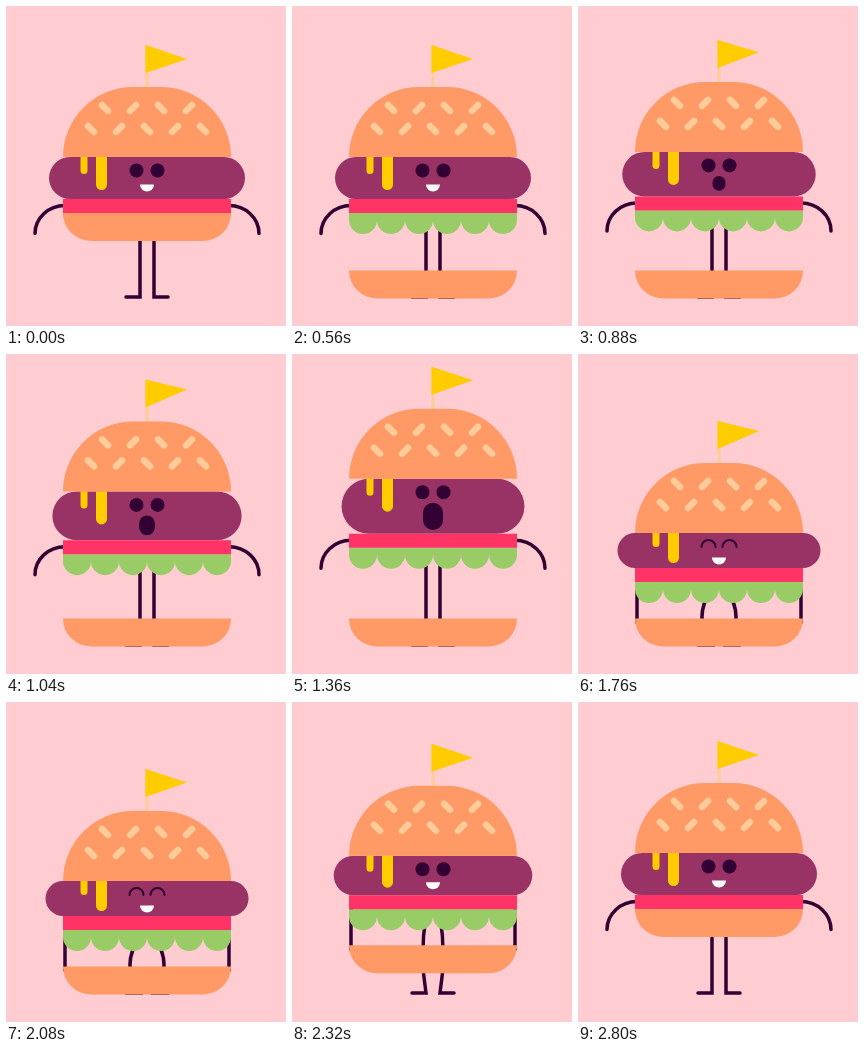
An HTML page with a canvas that plays this animation: 280x320 px, repeating every 2880 ms.

```html
<!DOCTYPE html>
<html lang="en">
<head>
<meta charset="utf-8">
<title>Stretching burger</title>
<style>
  html, body { margin: 0; width: 100%; height: 100%; overflow: hidden; background: #ffccd1; }
  canvas { display: block; }
</style>
</head>
<body>
<canvas id="stage" width="280" height="320"></canvas>
<script>
const ctx = document.getElementById('stage').getContext('2d');
const LOOP = 2880, STEP = 80, CENTER = 141, LIMB = 3.5;
const BG = '#ffccd1', BUN = '#ff9a66', SEED = '#ffcc99', YELLOW = '#ffcc00',
      MEAT = '#993366', DARK = '#330033', TOMATO = '#ff3366', LETTUCE = '#99cc66';

// Smooth 0..1 progress; a skew below 1 makes it start faster.
function ease(t, start, end, skew = 1) {
  const u = Math.min(1, Math.max(0, (t - start) / (end - start))) ** skew;
  return u * u * (3 - 2 * u);
}

function box(color, x, y, w, h, radii = 0) {
  ctx.fillStyle = color;
  ctx.beginPath();
  ctx.roundRect(x, y, w, h, radii);
  ctx.fill();
}

function disc(color, x, y, r, to = Math.PI * 2) {
  ctx.fillStyle = color;
  ctx.beginPath();
  ctx.arc(x, y, r, 0, to);
  ctx.fill();
}

function line(color, width, build) {
  ctx.strokeStyle = color;
  ctx.lineWidth = width;
  ctx.beginPath();
  build();
  ctx.stroke();
}

// Runs a drawing once as is and once flipped about the center line.
function mirrored(paint) {
  paint();
  ctx.save();
  ctx.translate(2 * CENTER, 0);
  ctx.scale(-1, 1);
  paint();
  ctx.restore();
}

function drawLimbs(tomato, bow, spread) {
  const mix = (down, out) => down + (out - down) * spread;
  const hip = tomato + 21, shoulder = tomato + 6.5;
  mirrored(() => {
    line(DARK, LIMB, () => {
      ctx.moveTo(134, hip);
      ctx.quadraticCurveTo(134 - 2 * bow, (hip + 291) / 2, 134, 291);
      ctx.lineTo(120, 291);
    });
    line(DARK, LIMB, () => {
      const hand = mix(59, 29);
      ctx.moveTo(59, shoulder);
      ctx.bezierCurveTo(mix(59, 42.5), shoulder + mix(16, 0),
        hand, shoulder + mix(32, 12.5), hand, shoulder + mix(48, 28));
    });
  });
}

function drawLettuce(y) {
  ctx.fillStyle = LETTUCE;
  ctx.beginPath();
  ctx.moveTo(57, y);
  ctx.lineTo(225, y);
  for (let x = 211; x > 57; x -= 28) ctx.arc(x, y + 7, 14, 0, Math.PI);
  ctx.fill();
}

function drawTopBun(y, flutter) {
  box(SEED, 139.5, y - 112, 3, 44);
  ctx.fillStyle = YELLOW;
  ctx.beginPath();
  ctx.moveTo(139.5, y - 112);
  ctx.lineTo(181, y - 98 - flutter);
  ctx.lineTo(139.5, y - 84);
  ctx.fill();

  box(BUN, 57, y - 70, 168, 70, [70, 70, 0, 0]);
  const seedRow = (left, rowY, count) => {
    for (let i = 0; i < count; i++) {
      const x = left + 28 * i, tilt = i % 2 ? -3 : 3;
      line(SEED, 6.5, () => {
        ctx.moveTo(x - 3, rowY - tilt);
        ctx.lineTo(x + 3, rowY + tilt);
      });
    }
  };
  seedRow(99, y - 49, 4);
  seedRow(85, y - 28, 5);
}

function drawDrip(x, y, w, h) {
  box(YELLOW, x, y, w, h, [0, 0, w / 2, w / 2]);
}

function drawFace(y, stretch, squash, t) {
  const asleep = t >= 1600 && t < 2160;
  for (const x of [CENTER - 10.5, CENTER + 10.5]) {
    if (asleep) line(DARK, 2, () => ctx.arc(x, y + 14, 7, Math.PI, 0));
    else disc(DARK, x, y + 13.5, 7);
  }
  if (stretch > 2 && t < 1600) {
    const w = 11.3 + .67 * stretch, h = 11.8 + 1.17 * stretch;
    box(DARK, CENTER - w / 2, y + 30 + .58 * stretch - h / 2, w, h, w / 2);
  } else {
    disc('#fff', CENTER, y + 27.5 + squash, 7, Math.PI);
  }
}

function draw(t) {
  const rise = ease(t, 720, 1440, .85), fall = ease(t, 1440, 1760);
  const spring = ease(t, 2080, 2440), settle = ease(t, 2440, 2560);
  const shift = -27 * rise + 55 * fall - 34 * spring + 6 * settle;
  const patty = 151 + shift;
  const tomato = 193 - 13.5 * rise + 34.5 * fall - 28 * spring + 7 * settle;
  const base = 207 + 57.5 * (ease(t, 240, 560) - ease(t, 2250, 2420));
  const armSpread = 1 - ease(t, 1440, 1720) + ease(t, 2320, 2800, .6);
  const flutter = t > 720 && t < 2160 ? 2 - 2 * Math.cos(t / 360 * Math.PI) : 0;

  const height = tomato - patty, stretch = height - 42;
  const halfWidth = 98 - stretch / 2, squash = .43 * Math.min(0, stretch);
  const gap = base - tomato - 14;

  ctx.fillStyle = BG;
  ctx.fillRect(0, 0, 280, 320);
  ctx.lineCap = 'round';

  drawLimbs(tomato, 1.9 * Math.sqrt(Math.max(0, shift)), armSpread);
  drawLettuce(tomato + 7 + Math.max(0, Math.min(7, gap / 3)));
  box(BUN, 57, base, 168, 28, [0, 0, 28, 28]);
  box(MEAT, CENTER - halfWidth, patty, halfWidth * 2, height, height / 2);
  box(TOMATO, 57, tomato, 168, 14);
  drawTopBun(patty, flutter);
  drawDrip(74.5, patty, 7, 17 + squash);
  drawDrip(90, patty, 11, 33 + squash);
  drawFace(patty, stretch, squash, t);
}

function tick() {
  const t = performance.now() % LOOP;
  draw(Math.floor(t / STEP) * STEP);
  requestAnimationFrame(tick);
}
tick();
</script>
</body>
</html>
```
